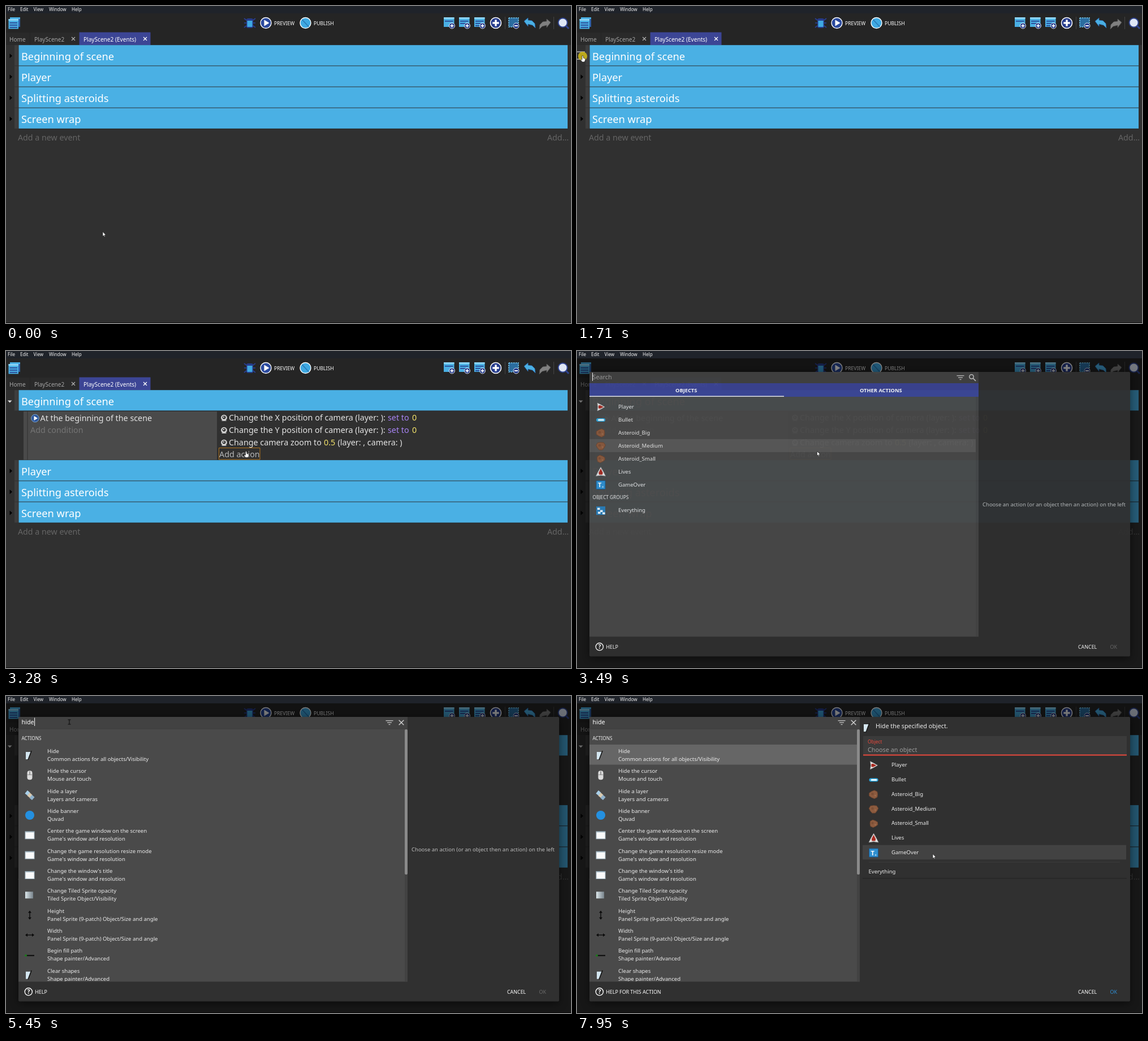
Write an HTML page with a canvas that moves like this. It is 999x561 px and loops after 8 s.

```html
<!DOCTYPE html>
<html lang="en">
<head>
<meta charset="utf-8">
<title>Event editor</title>
<style>
html, body { margin: 0; width: 100%; height: 100%; overflow: hidden; background: #303030; }
canvas { display: block; }
</style>
</head>
<body>
<canvas id="stage" width="999" height="561"></canvas>
<script>
const W = 999, H = 561, LOOP = 8000;
const stage = document.getElementById('stage').getContext('2d');
const layer = Object.assign(document.createElement('canvas'), { width: W, height: H });
const dialogCtx = layer.getContext('2d');
let g = stage;

const BLUE = '#4ab0e4', NAVY = '#263c8c', INDIGO = '#3c4595', WHITE = '#fff', PALE = '#ececec';

// ---------- drawing helpers ----------
function text(str, x, y, size, color = PALE, weight = 400) {
  g.font = `${weight} ${size}px "Noto Sans", "Open Sans", sans-serif`;
  g.fillStyle = color;
  g.fillText(str, x, y);
}
function rect(x, y, w, h, color) { g.fillStyle = color; g.fillRect(x, y, w, h); }
function round(x, y, w, h, r, color) {
  g.beginPath(); g.roundRect(x, y, w, h, r); g.fillStyle = color; g.fill();
}
function circle(x, y, r, fill, stroke, width = 1.5) {
  g.beginPath(); g.arc(x, y, r, 0, 7);
  if (fill) { g.fillStyle = fill; g.fill(); }
  if (stroke) { g.strokeStyle = stroke; g.lineWidth = width; g.stroke(); }
}
function trace(x, y, pts) {
  g.beginPath();
  for (let i = 0; i < pts.length; i += 2) g.lineTo(x + pts[i], y + pts[i + 1]);
}
function poly(x, y, pts, fill, stroke, width = 1) {
  trace(x, y, pts); g.closePath();
  g.fillStyle = fill; g.fill();
  if (stroke) { g.strokeStyle = stroke; g.lineWidth = width; g.stroke(); }
}
function line(x, y, pts, color, width = 1) {
  trace(x, y, pts); g.strokeStyle = color; g.lineWidth = width; g.stroke();
}
function cross(x, y, r, color, width = 1.2) {
  line(x, y, [-r, -r, r, r], color, width);
  line(x, y, [-r, r, r, -r], color, width);
}
function plus(x, y, r, color, width) {
  line(x, y, [-r, 0, r, 0], color, width);
  line(x, y, [0, -r, 0, r], color, width);
}
function turned(x, y, angle, draw) {
  g.save(); g.translate(x, y); g.rotate(angle); draw(); g.restore();
}

// ---------- toolbar ----------
function listIcon(x, y, w, h, stripes) {
  rect(x, y, w, h, BLUE);
  rect(x, y, w, 3, '#8bd4f5');
  for (let i = 0; i < stripes; i++) rect(x + 2, y + 6 + i * 4, w - 4, 1.6, NAVY);
}
function plusBadge(x, y, r) {
  circle(x, y, r, NAVY, WHITE, r / 6);
  plus(x, y, r * 0.6, WHITE, r * 0.35);
}
function bug(x, y) {
  for (const dy of [-5, 0, 5]) line(x, y, [-10, dy * 1.6, -6, dy, 6, dy, 10, dy * 1.6], '#2b3f96', 1.6);
  round(x - 6, y - 8, 12, 17, 3, NAVY);
  rect(x - 4.5, y - 4, 9, 11, '#3fa9e2');
}
function bentArrow(x, y, dir, color, shade) {
  const p = [-10, -3, -3, -9, -3, -5, 4, -4, 9, 1, 10, 9, 5, 4, -3, 2, -3, 6];
  poly(x, y, p.map((v, i) => i % 2 ? v : v * dir), color, shade, 0.8);
}
function toolbar() {
  rect(0, 0, W, 13, '#1f232a');
  [['File', 3], ['Edit', 25], ['View', 48.5], ['Window', 76], ['Help', 116]]
    .forEach(([s, x]) => text(s, x, 9, 8.1, '#f2f2f2'));
  rect(0, 13, W, 56, '#252525');
  rect(7, 20, 18, 17, '#2f62ab');
  rect(7, 20, 18, 3, BLUE);
  listIcon(4.5, 23, 17.5, 17.5, 3);
  bug(431, 30);
  circle(459.5, 30, 9.5, '#2b4a9e', WHITE, 1.4);
  poly(459.5, 30, [-3, -5.5, 6, 0, -3, 5.5], WHITE);
  text('PREVIEW', 474, 33.5, 8.6, WHITE);
  circle(529.5, 30, 9.5, '#3fa9e2', WHITE, 1.4);
  line(529.5, 30, [-6, -6, 6, 7], '#2876b4', 1.5);
  text('PUBLISH', 544, 33.5, 8.6, WHITE);
  [774, 801, 828].forEach((x, i) => {
    listIcon(x, 20, 18.5, 17, i + 1);
    plusBadge(x + 14.5, 35, 5);
  });
  plusBadge(866, 30, 9.5);
  rect(882, 19, 1, 22, '#444');
  rect(889, 21, 17, 16, '#2b6da0');
  g.setLineDash([2.5, 1.5]);
  line(889, 21, [0, 0, 17, 0, 17, 16, 0, 16, 0, 0], '#7ccdf2', 1.6);
  g.setLineDash([]);
  circle(902, 35, 5, NAVY, WHITE, 0.8);
  rect(899, 34, 6, 2, WHITE);
  bentArrow(926, 30, 1, BLUE, '#2a62a8');
  bentArrow(953, 32, -1, '#808080', '#5a5a5a');
  rect(968, 19, 1, 22, '#444');
  line(990, 35, [0, 0, 5, 5], '#2f438f', 3);
  circle(984.5, 29.5, 8, '#dfe7f5', '#2f438f', 2);
  // tabs
  rect(0, 47, 42, 22, '#2a2a2a');
  rect(43, 47, 86, 22, '#2a2a2a');
  rect(129.5, 46.5, 126, 22.5, INDIGO);
  text('Home', 6, 62.5, 10.1, '#a6a6a6');
  text('PlayScene2', 50, 62.5, 10.1, '#a6a6a6');
  text('PlayScene2 (Events)', 137, 62.5, 10.1, WHITE);
  cross(119, 58, 3, '#b0b0b0');
  cross(246, 58, 3, WHITE);
}

// ---------- event sheet ----------
const ROW = 37.15;
function groupRow(title, y, open) {
  rect(15, y, 6.5, 36.2, '#3e3e3e');
  rect(22.5, y + 36.2, 970.5, 1, '#262b2e');
  rect(22.5, y, 970.5, 36.2, BLUE);
  text(title, 27, Math.round(y + 26.7), 18.25, WHITE);
  if (open) poly(6.7, y + 20, [-3.8, -1.8, 3.8, -1.8, 0, 2.2], '#dcdcdc');
  else poly(6.5, y + 19, [0, -4, 4.5, 0, 0, 4], '#000');
}
function cameraIcon(x, y) {
  circle(x, y, 5.3, '#d9d9d9');
  circle(x, y - 0.5, 3, '#333');
  circle(x - 0.6, y - 1, 1.1, WHITE);
  rect(x - 4, y + 4.5, 8, 1.5, '#bbb');
}
function openedEvent(hoverAdd) {
  const S = 14.3, violet = '#a884f5', yellow = '#f2e26a';
  rect(31, 107, 6.5, 85.5, '#4a4a4a');
  rect(38.5, 107, 334.5, 85.5, '#4a4a4a');
  circle(51.5, 119, 6.8, '#2c569d', '#7fa8cf', 1);
  poly(51.5, 119, [-2, -4, 4.5, 0, -2, 4], WHITE);
  text('At the beginning of the scene', 60.5, 124, S, '#e4e4e4');
  text('Add condition', 43, 145, S, '#757575');
  [['X', 123], ['Y', 145]].forEach(([axis, y]) => {
    cameraIcon(385.5, y - 5);
    text(`Change the ${axis} position of camera (layer: ):`, 394, y, S + 0.1, '#e4e4e4');
    text('set to', 675, y, S, violet);
    text('0', 718, y, S, yellow);
  });
  cameraIcon(385.5, 162);
  text('Change camera zoom to', 394, 167, S, '#e4e4e4');
  text('0.5', 562, 167, S, yellow);
  text('(layer: , camera: )', 586.5, 167, S, '#e4e4e4');
  if (hoverAdd) line(376.5, 171.5, [0, 0, 72.5, 0, 72.5, 20.5, 0, 20.5, 0, 0], '#b0731c', 1);
  text('Add action', 377, 188, S, hoverAdd ? '#b8b8b8' : '#757575');
}
function sheet(t) {
  const open = t >= 1840, shift = open ? 86.8 : 0;
  rect(0, 69, W, H - 69, '#303030');
  groupRow('Beginning of scene', 69.2, open);
  if (open) openedEvent(t >= 2740);
  ['Player', 'Splitting asteroids', 'Screen wrap']
    .forEach((s, i) => groupRow(s, 69.2 + (i + 1) * ROW + shift, false));
  text('Add a new event', 21, 238 + shift, 14.25, '#656565');
  text('Add...', 957, 238 + shift, 14.25, '#656565');
  rect(0, 560, W, 1, '#111');
}

// ---------- object icons ----------
function ship(x, y, angle, size) {
  turned(x, y, angle, () => {
    g.scale(size, size);
    poly(0, 0, [7, 0, 0, -4, -6, -7, -5, 0, -6, 7, 0, 4], '#e6e6e6', '#a5a5a5', 0.6);
    poly(0, 0, [5, 0, -1, 3, -4, 2.5, -4, -2.5, -1, -3], '#a92a20');
  });
}
function bullet(x, y) {
  round(x - 8, y - 3, 16, 6, 3, '#2ca6dd');
  round(x - 5, y - 1.6, 11, 3.2, 1.6, '#f2fbff');
}
function asteroid(x, y, r, turn) {
  const pts = [];
  for (let i = 0; i < 9; i++) {
    const a = i * Math.PI * 2 / 9 + turn, k = r * (i % 3 ? 1 : 0.84);
    pts.push(k * Math.cos(a), k * 0.9 * Math.sin(a));
  }
  poly(x, y, pts, '#8c5b3f', '#70462f', 1);
  circle(x - 2, y - 1, r * 0.28, '#7c4f36');
  circle(x + 3, y + 2, r * 0.18, '#9f6c4d');
}
function textIcon(x, y) {
  rect(x - 8, y - 7.5, 16, 15, '#2f8fd0');
  line(x - 8, y - 7.5, [0, 0, 16, 0, 16, 15, 0, 15, 0, 0], '#1c5586', 1);
  text('T', x - 5, y + 4, 11, WHITE, 700);
  text('x', x + 2, y + 5, 6, WHITE);
}
function groupIcon(x, y) {
  rect(x - 8, y - 7.5, 16, 15, '#2a7db8');
  [[-6, -5], [-1, -1], [-5, 2], [3, 3]].forEach(([a, b]) => rect(x + a, y + b, 4.5, 3.5, '#e8f4fb'));
}
const objects = [
  ['Player', (x, y) => ship(x, y, 0, 1)],
  ['Bullet', bullet],
  ['Asteroid_Big', (x, y) => asteroid(x, y, 8.3, 0)],
  ['Asteroid_Medium', (x, y) => asteroid(x, y, 8.3, 0.5)],
  ['Asteroid_Small', (x, y) => asteroid(x, y, 7.6, 1)],
  ['Lives', (x, y) => ship(x, y, -Math.PI / 2, 1.2)],
  ['GameOver', textIcon]
];

// ---------- action icons ----------
function hideIcon(x, y) {
  poly(x, y, [-7, -6, 2, -6, -2, 7, -7, 7], '#d4e6f0');
  line(x, y, [3, -8, -3, 8], '#111', 1.6);
}
function mouseIcon(x, y) {
  round(x - 4.5, y - 8, 9, 16, 4, '#dcdcdc');
  rect(x - 0.5, y - 7, 1, 6, '#555');
  line(x, y, [-4, -1, 4, -1], '#777', 0.8);
}
function layersIcon(x, y) {
  ['#a9cfe8', '#d8c9b0', '#8fb1cc'].forEach((color, i) =>
    turned(x - 4 + i * 4, y - 4 + i * 4, 0.7, () => rect(-3, -3.5, 6, 7, color)));
}
function windowIcon(x, y) {
  rect(x - 8.5, y - 7, 17, 14, '#9fb4c0');
  rect(x - 7.5, y - 5, 15, 11, '#fafafa');
}
function fadeIcon(x, y) {
  const shade = g.createLinearGradient(x - 8, 0, x + 6, 0);
  shade.addColorStop(0, '#dbe6ea'); shade.addColorStop(1, '#77828a');
  rect(x - 8, y - 6, 14, 12, shade);
}
function doubleArrow(x, y, angle) {
  turned(x, y, angle, () => {
    line(0, 0, [-6, 0, 6, 0], '#0b0b0b', 1.4);
    poly(0, 0, [-8, 0, -4, -3, -4, 3], '#0b0b0b');
    poly(0, 0, [8, 0, 4, -3, 4, 3], '#0b0b0b');
  });
}
function pathIcon(x, y) {
  line(x, y, [-7, 1, 8, 1], '#0b0b0b', 2);
  circle(x - 7, y + 1, 2, '#1d7a1d');
}
const GAME_WINDOW = "Game's window and resolution";
const PANEL = 'Panel Sprite (9-patch) Object/Size and angle';
const actions = [
  ['Hide', 'Common actions for all objects/Visibility', hideIcon],
  ['Hide the cursor', 'Mouse and touch', mouseIcon],
  ['Hide a layer', 'Layers and cameras', layersIcon],
  ['Hide banner', 'Quvad', (x, y) => circle(x, y, 8, '#2490e0')],
  ['Center the game window on the screen', GAME_WINDOW, windowIcon],
  ['Change the game resolution resize mode', GAME_WINDOW, windowIcon],
  ["Change the window's title", GAME_WINDOW, windowIcon],
  ['Change Tiled Sprite opacity', 'Tiled Sprite Object/Visibility', fadeIcon],
  ['Height', PANEL, (x, y) => doubleArrow(x, y, Math.PI / 2)],
  ['Width', PANEL, (x, y) => doubleArrow(x, y, 0)],
  ['Begin fill path', 'Shape painter/Advanced', pathIcon],
  ['Clear shapes', 'Shape painter/Advanced', hideIcon]
];

// ---------- dialog ----------
function objectTabs(pointer) {
  rect(22, 57, 688, 24, INDIGO);
  rect(22, 79.5, 344, 1.5, PALE);
  text('OBJECTS', 174, 73.3, 9.3, WHITE, 600);
  text('OTHER ACTIONS', 500, 73.3, 9.3, WHITE, 600);
  const hover = Math.floor((pointer.y - 86.5) / 23);
  objects.forEach(([name, icon], i) => {
    const y = 99 + i * 23;
    if (i === hover) rect(22, y - 12, 683, 23, '#5a5a5a');
    icon(42, y);
    text(name, 73, y + 3.3, 9.55);
  });
  text('OBJECT GROUPS', 27.5, 262, 8.25);
  groupIcon(42, 282.5);
  text('Everything', 73, 285.3, 9.55);
}
function actionList(right, selected) {
  rect(22, 57.5, right - 22, 1, '#3a3a3a');
  text('ACTIONS', 27.5, 78, 8.25);
  if (selected) rect(22, 86, right - 27, 35.5, '#666');
  g.save();
  g.beginPath(); g.rect(22, 58, right - 22, 447); g.clip();
  actions.forEach(([title, group, icon], i) => {
    const y = 101 + i * 35.33;
    icon(42, y + 4);
    text(title, 73, y, 9.55);
    text(group, 73, y + 14, 9.55);
  });
  g.restore();
  rect(right - 5, 58, 5, 447, '#424242');
  round(right - 5, 59, 5, 257, 2, '#8a8a8a');
}
function parameters(t, pointer) {
  hideIcon(514, 56);
  text('Hide the specified object.', 528, 57, 10.8);
  rect(506, 71, 466, 33, '#3b3b3b');
  rect(506, 103.5, 466, 2, '#e8483c');
  text('Object', 514, 84, 8.4, '#e8483c');
  text('Choose an object', 514, 99, 10.8, '#9c9c9c');
  if (Math.floor((t - 6400) / 510) % 2 === 0) rect(514, 87, 1, 15, WHITE);
  const hover = pointer.x > 505 ? Math.floor((pointer.y - 109) / 25.8) : -1;
  objects.forEach(([name, icon], i) => {
    const y = 122 + i * 25.8;
    if (i === hover) rect(505, y - 13, 466, 25.5, '#424242');
    icon(524.5, y + 0.7);
    text(name, 556, y + 3.2, 9.55);
  });
  rect(516, 293.5, 444, 1, '#3c3c3c');
  text('Everything', 515.5, 314.3, 9.55);
  rect(505, 322, 467, 1.2, '#242424');
}
function dialog(t, pointer) {
  const typed = t < 4850 ? '' : 'hide'.slice(0, t < 4920 ? 1 : t < 4990 ? 2 : t < 5450 ? 3 : 4);
  const chosen = t >= 6330, right = chosen ? 500 : 710;
  g.clearRect(0, 0, W, H);
  g.shadowColor = 'rgba(0,0,0,.5)'; g.shadowBlur = 14; g.shadowOffsetY = 3;
  round(22, 37, 956, 503.5, 2, '#303030');
  g.shadowColor = 'transparent';
  rect(22, 37, right - 22, 468.5, '#4a4a4a');
  rect(22, 37, right - 22, 20.5, '#424242');
  text(typed || 'Search', 27.5, 50, 10.75, typed ? WHITE : '#a2a2a2');
  const since = t < 4850 ? t - 3380 : t < 5450 ? 0 : t - 5450;
  if (!chosen && Math.floor(since / 530) % 2 === 0)
    rect(typed ? 28 + g.measureText(typed).width : 27, 38.5, 1, 14.5, WHITE);
  [6.5, 4, 1.5].forEach((w, i) => rect(right - 32 - w, 43 + i * 3.4, w * 2, 1.3, '#c4c4c4'));
  if (typed) cross(right - 11, 47, 4.3, '#d0d0d0', 1.4);
  else {
    circle(right - 12.5, 45.5, 3.7, null, '#c4c4c4', 1.5);
    line(right - 10, 48, [0, 0, 5, 5], '#c4c4c4', 1.7);
  }
  if (t < 4920) {
    objectTabs(pointer);
    rect(705, 81, 5, 424, '#454545');
  } else actionList(right, chosen);
  if (chosen) parameters(t, pointer);
  else text('Choose an action (or an object then an action) on the left', 717, 275.3, 9.5, '#bcbcbc');
  circle(39.8, 523.3, 6.6, null, WHITE, 1.4);
  text('?', 37.4, 527.3, 10.5, WHITE, 600);
  text(chosen ? 'HELP FOR THIS ACTION' : 'HELP', 51.3, 526.8, 8.85, WHITE);
  text('CANCEL', 886, 526.8, 8.9, WHITE);
  text('OK', 942.5, 526.8, 8.9, chosen ? '#2f8fd6' : '#6a6a6a');
}

// ---------- pointer ----------
const path = [ // time, x, y
  [0, 171, 399.5], [69, 171, 399.5], [70, 175, 403.5], [620, 175, 403.5], [1380, 10, 88],
  [2050, 10, 88], [2810, 424.5, 177.5], [3490, 424.5, 177.5], [3910, 112, 46], [5720, 112, 46],
  [5990, 111, 106], [6400, 111, 106], [6670, 307, 116], [6940, 648, 275], [7340, 648, 275],
  [7930, 629, 279.5], [LOOP, 629, 279.5]
];
function pointerAt(t) {
  const i = path.findIndex(k => k[0] > t);
  const [t0, x0, y0] = path[i - 1], [t1, x1, y1] = path[i];
  const p = (t - t0) / (t1 - t0), e = p * p * (3 - 2 * p);
  return { x: x0 + (x1 - x0) * e, y: y0 + (y1 - y0) * e };
}
const clicks = [[350, 480], [1580, 1840], [3140, 3280], [4040, 4170], [6190, 6330]];
const within = (t, a, b) => t >= a && t < b;

function drawPointer(t, { x, y }) {
  if (within(t, 1710, 1840)) {
    rect(0, 80.5, 14, 1.2, '#d8d8d8');
    rect(0, 93.5, 14, 1.2, '#d8d8d8');
  }
  if (clicks.some(([a, b]) => within(t, a, b))) circle(x, y + 1, 8, 'rgba(212,190,24,.86)');
  if (within(t, 1310, 2150) || within(t, 2740, 3350)) {
    poly(x, y, [-1, 0, 1, 0, 1.3, 4, 4.5, 5, 4.5, 8, 3.2, 11, -1, 11, -3.5, 7, -2.5, 6, -1, 7], WHITE, '#111', 0.6);
  } else if (within(t, 3840, 5790)) {
    line(x, y, [-2.5, -4, 2.5, -4], '#111', 1.2);
    line(x, y, [-2.5, 4, 2.5, 4], '#111', 1.2);
    line(x, y, [0, -4, 0, 4], '#111', 1.2);
  } else {
    poly(x, y, [0, 0, 0, 8, 1.8, 6.4, 3.1, 9.2, 4.3, 8.6, 3, 5.9, 5.5, 5.7], WHITE, '#111', 0.6);
  }
}

function frame() {
  const t = performance.now() % LOOP, pointer = pointerAt(t);
  g = stage;
  toolbar();
  sheet(t);
  const p = Math.min(1, Math.max(0, (t - 3310) / 270));
  if (p > 0) {
    const alpha = 1 - (1 - p) ** 2.5;
    rect(0, 13, W, H - 13, `rgba(0,0,0,${0.52 * alpha})`);
    g = dialogCtx;
    dialog(t, pointer);
    g = stage;
    g.globalAlpha = alpha;
    g.drawImage(layer, 0, Math.round(-18 * (1 - p) ** 4));
    g.globalAlpha = 1;
  }
  drawPointer(t, pointer);
  requestAnimationFrame(frame);
}
requestAnimationFrame(frame);
</script>
</body>
</html>
```
